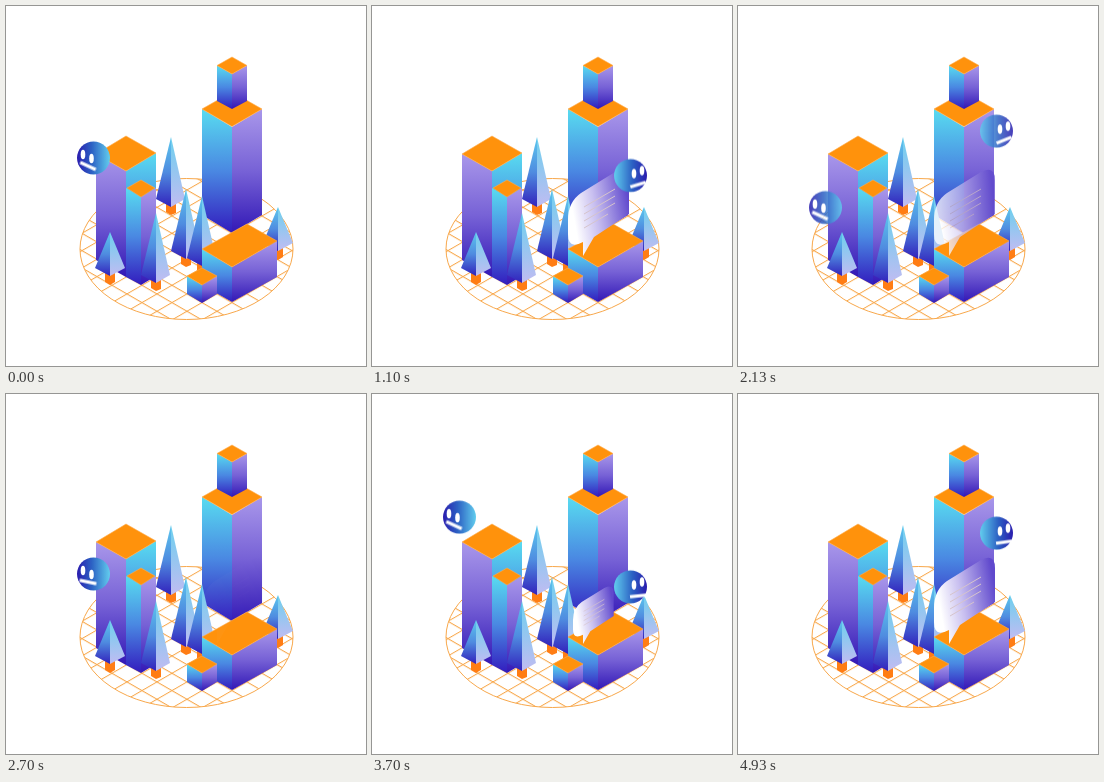
Recreate the animation shown at these times as an HTML page without scripts. Size 360 by 360 pixels, loop 5 s.

```html
<!DOCTYPE html>
<html lang="en">
<head>
<meta charset="utf-8">
<title>Isometric city chat</title>
<style>
  html, body { margin: 0; width: 100%; height: 100%; overflow: hidden; background: #fff; }
  svg { display: block; width: 100vw; height: 100vh; }

  .roof { fill: #ff920c; stroke: #ffae50; stroke-width: .6; }
  .cyan { fill: url(#cyan); }
  .lilac { fill: url(#lilac); }
  .trunk { fill: #ff7d14; }
  .eyes { fill: #fff; }
  .mouth { stroke: #fff; stroke-width: 3.2; animation: 5s linear infinite; }

  .left { animation: rise-left 5s infinite, show-left 5s linear infinite; }
  .right { animation: rise-right 5s infinite, show-right 5s linear infinite; }
  .left .mouth { transform-origin: 82px 160px; animation-name: tilt-left; }
  .right .mouth { transform-origin: 266px 178px; animation-name: tilt-right; }
  .bubble { transform-origin: 211px 250px; animation: grow 5s infinite, show-bubble 5s linear infinite; }

  /* Each rise is a sine ease; the loop cuts in mid-flight. */
  @keyframes rise-left {
    0% { transform: translateY(0); animation-timing-function: cubic-bezier(.61, 1, .88, 1); }
    26% { transform: translateY(-49px); animation-timing-function: step-end; }
    36.3% { transform: translateY(53px); animation-timing-function: cubic-bezier(.37, 0, .63, 1); }
    89.8%, 100% { transform: translateY(-49px); }
  }
  @keyframes show-left {
    0%, 15% { opacity: 1; }
    21%, 37% { opacity: 0; }
    43.6%, 78.9% { opacity: 1; }
    84.9%, 100% { opacity: 0; }
  }
  @keyframes rise-right {
    0% { transform: translateY(36px); animation-timing-function: cubic-bezier(.12, 0, .39, 0); }
    25.1% { transform: translateY(-8px); animation-timing-function: cubic-bezier(.61, 1, .88, 1); }
    53.7% { transform: translateY(-52px); animation-timing-function: step-end; }
    60.4% { transform: translateY(36px); animation-timing-function: cubic-bezier(.12, 0, .39, 0); }
    89% { transform: translateY(-8px); animation-timing-function: linear; }
    100% { transform: translateY(-33px); }
  }
  @keyframes show-right {
    0%, 2.1% { opacity: 0; }
    8.1%, 41.7% { opacity: 1; }
    48%, 66% { opacity: 0; }
    72%, 100% { opacity: 1; }
  }
  @keyframes grow {
    0%, 4% { transform: scale(0); animation-timing-function: cubic-bezier(.25, .46, .45, .94); }
    19%, 54.4% { transform: scale(1); animation-timing-function: step-end; }
    55%, 68% { transform: scale(0); animation-timing-function: cubic-bezier(.25, .46, .45, .94); }
    83%, 100% { transform: scale(1); }
  }
  @keyframes show-bubble {
    0%, 4% { opacity: 0; }
    10%, 39% { opacity: 1; }
    54.4%, 68% { opacity: 0; }
    73%, 100% { opacity: 1; }
  }
  @keyframes tilt-left {
    0%, 42.6%, 64%, 74%, 100% { transform: rotate(25deg); }
    53.5% { transform: rotate(11deg); }
  }
  @keyframes tilt-right {
    0%, 10%, 74% { transform: rotate(-6deg); }
    22% { transform: rotate(-17deg); }
    32% { transform: rotate(-7deg); }
    42.6%, 60% { transform: rotate(-22deg); }
    84%, 100% { transform: rotate(-8deg); }
  }
</style>
</head>
<body>
<svg viewBox="0 0 360 360" xmlns="http://www.w3.org/2000/svg">
  <defs>
    <linearGradient id="cyan" x2="0" y2="1">
      <stop stop-color="#58dcf0"/><stop offset=".5" stop-color="#4a88e2"/><stop offset="1" stop-color="#321cbe"/>
    </linearGradient>
    <linearGradient id="lilac" x2="0" y2="1">
      <stop stop-color="#a997ea"/><stop offset=".5" stop-color="#7762d6"/><stop offset="1" stop-color="#3218b6"/>
    </linearGradient>
    <linearGradient id="leaf" x2="0" y2="1">
      <stop stop-color="#5cc8ee"/><stop offset=".5" stop-color="#4f8ce0"/><stop offset="1" stop-color="#3222bc"/>
    </linearGradient>
    <linearGradient id="pale" x2="0" y2="1">
      <stop stop-color="#6cd0ee"/><stop offset="1" stop-color="#c0bcf2"/>
    </linearGradient>
    <linearGradient id="skin">
      <stop stop-color="#2a1cae"/><stop offset=".45" stop-color="#2c62c4"/><stop offset="1" stop-color="#62cdee"/>
    </linearGradient>
    <linearGradient id="skin-flipped" href="#skin" x1="1" x2="0"/>
    <linearGradient id="speech" x1="0" y1=".6" x2="1" y2=".35">
      <stop offset=".1" stop-color="#fff"/><stop offset=".45" stop-color="#c9c0f0"/><stop offset="1" stop-color="#6049cd"/>
    </linearGradient>
    <pattern id="grid" width="1" height="1" patternUnits="userSpaceOnUse" patternTransform="matrix(15 8.66 -15 8.66 226 296)">
      <path d="M0 0H1M0 0V1" fill="none" stroke="#f8a84c" stroke-width=".13"/>
    </pattern>
    <g id="tall">
      <path class="trunk" d="M-5 64H5V76L0 78-5 75Z"/>
      <path fill="url(#leaf)" d="M0 0-15 62 0 70Z"/>
      <path fill="url(#pale)" d="M0 0 14 62 0 70Z"/>
    </g>
    <g id="short">
      <path class="trunk" d="M-5 38H5V50L0 53-5 50Z"/>
      <path fill="url(#leaf)" d="M0 0-15 36 0 44Z"/>
      <path fill="url(#pale)" d="M0 0 15 36 0 44Z"/>
    </g>
  </defs>

  <ellipse cx="180.5" cy="243" rx="106.5" ry="70.5" fill="url(#grid)" stroke="#f8a84c"/>

  <g id="left-tower">
    <path class="lilac" d="M90 148 120 165V271L90 254Z"/>
    <path class="cyan" d="M120 165 150 147V254L120 271Z"/>
    <path class="roof" d="M120 130 150 147 120 165 90 148Z"/>
    <path class="cyan" d="M120 182 135 191V279L120 271Z"/>
    <path class="lilac" d="M135 191 150 182V270L135 279Z"/>
    <path class="roof" d="M135 174 149 182 135 191 121 182Z"/>
  </g>

  <g id="main-tower">
    <path class="cyan" d="M196 103 226 121V227L196 209Z"/>
    <path class="lilac" d="M226 121 256 103V209L226 227Z"/>
    <path class="roof" d="M226 86 256 103 226 120.5 196 103Z"/>
    <path class="cyan" d="M211 59.5 226 68V103L211 95Z"/>
    <path class="lilac" d="M226 68 241 59.5V95L226 103Z"/>
    <path class="roof" d="M226 51 241 59.5 226 68 211 59.5Z"/>
  </g>

  <use href="#tall" x="165" y="131"/>
  <use href="#short" x="272" y="201"/>
  <use href="#tall" x="180" y="183"/>
  <use href="#tall" x="196" y="190"/>

  <g id="hall">
    <path class="cyan" d="M196 243 226 261V296L196 279Z"/>
    <path class="lilac" d="M226 261 271 235V271L226 296Z"/>
    <path class="roof" d="M241 218 271 235 226 261 196 243Z"/>
    <path class="cyan" d="M181 270 196 279V297L181 288Z"/>
    <path class="lilac" d="M196 279 211 270V288L196 297Z"/>
    <path class="roof" d="M196 262 211 270 196 279 181 270Z"/>
  </g>

  <use href="#short" x="104" y="226"/>
  <use href="#tall" x="150" y="207"/>

  <g class="bubble">
    <path fill="url(#speech)" d="M196 214Q196 196 209 187L243 166Q257 159 257 174V208L222 231 211 250V236Q196 244 196 228Z"/>
    <path fill="none" stroke="#d6c4cc" d="M212 201 243 183M212 208 243 190M212 215 243 197M212 222 236 208"/>
  </g>

  <g class="right">
    <circle cx="258.5" cy="169" r="16.5" fill="url(#skin-flipped)"/>
    <g class="eyes"><ellipse cx="262" cy="167" rx="2.3" ry="4.8"/><ellipse cx="270" cy="164" rx="2.3" ry="4.8"/></g>
    <path class="mouth" d="M258 178H274"/>
  </g>
  <g class="left">
    <circle cx="87.5" cy="152" r="16.5" fill="url(#skin)"/>
    <g class="eyes"><ellipse cx="77" cy="148.5" rx="2.3" ry="4.8"/><ellipse cx="85.5" cy="152.5" rx="2.3" ry="4.8"/></g>
    <path class="mouth" d="M73.5 160H90.5"/>
  </g>
</svg>
</body>
</html>
```
